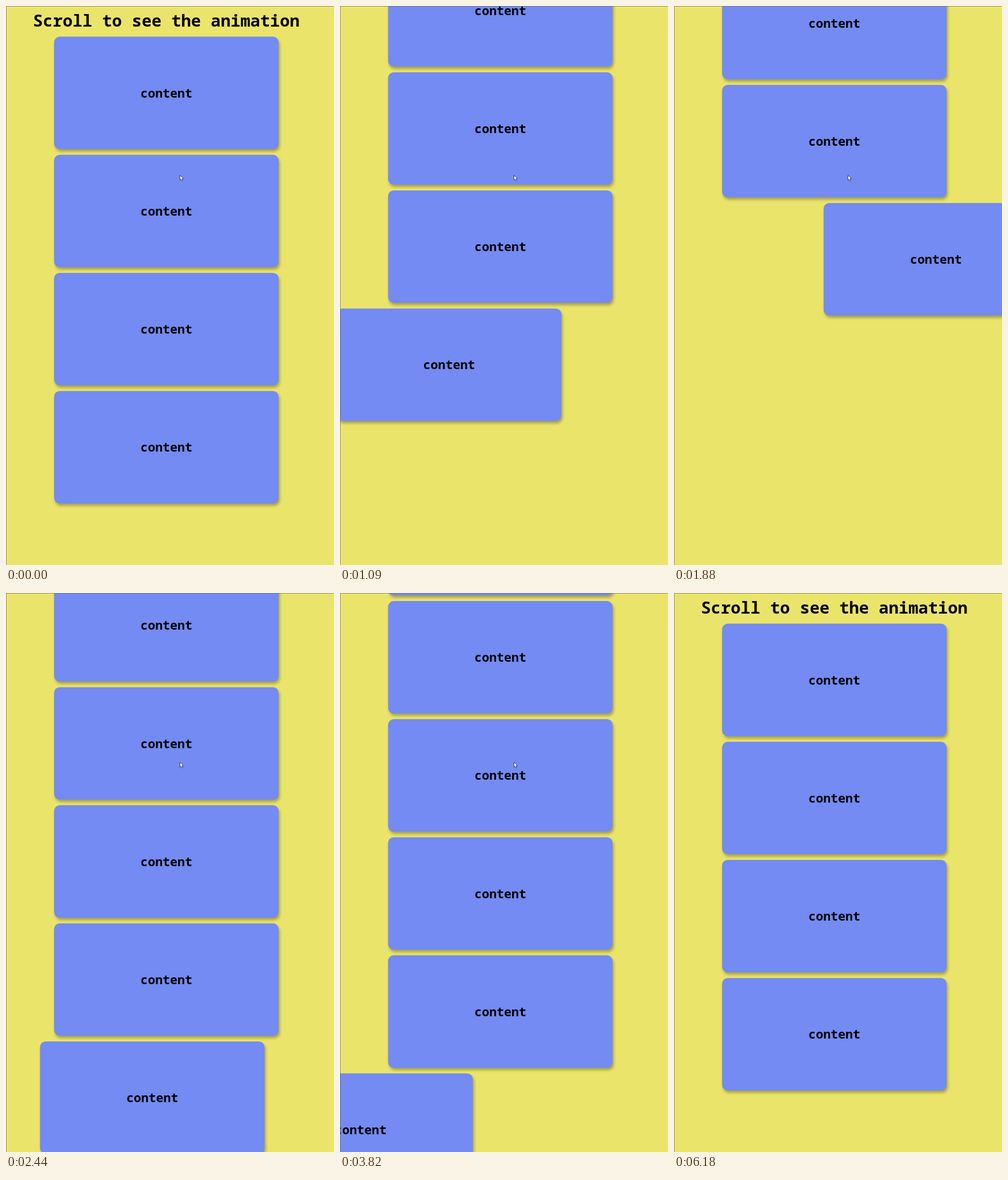
Recreate the animation shown at these times as an HTML page with a canvas. Size 574 by 976 pixels, loop 6560 ms.

```html
<!DOCTYPE html>
<html lang="en">
<head>
<meta charset="utf-8">
<title>Scroll animation</title>
<style>
  html, body { margin: 0; width: 100%; height: 100%; overflow: hidden; background: #ebe46b; }
  canvas { display: block; }
</style>
</head>
<body>
<canvas id="stage" width="574" height="976"></canvas>
<script>
const W = 574, H = 976, LOOP = 6560;
const ctx = document.getElementById('stage').getContext('2d');
const FONT = '"Noto Sans Mono", "DejaVu Sans Mono", monospace';

const COUNT = 12, LEFT = 84.2, TOP = 53.6, BOX_W = 392.8, BOX_H = 196.3, PITCH = 206.2;
const CENTER = LEFT + BOX_W / 2;
const TRIGGER = 791, SLIDE = 400, TRAVEL = BOX_W * 4;

// [time, scroll offset]
const SCROLL = [
  [0, 0], [410, 0], [460, 15], [560, 88], [700, 205], [809, 293.6], [971, 437],
  [1090, 555.2], [1170, 680], [1330, 868], [1400, 884], [1590, 884], [1640, 912.2],
  [1760, 1140], [1880, 1358.2], [1980, 1430], [2106, 1530.8], [2135, 1538.8],
  [2750, 1538.8], [2850, 1490], [3200, 1205], [3500, 950], [3766, 706], [3820, 659],
  [4100, 440], [4400, 282], [4600, 177], [4680, 163.8], [4950, 163.8],
  [5050, 80], [5160, 0], [LOOP, 0]
];

// [time, x, y] of the pointer tip
const POINTER = [
  [0, 304.5, 295.5], [5680, 304.5, 295.5], [5780, 280, 375], [5880, 240, 460],
  [5960, 217, 545], [6040, 197, 600], [6100, 175, 632], [6170, 127, 638], [LOOP, 127, 638]
];
const POINTER_GONE = 6180;

// Monotone cubic interpolation through the given keys
function curve(keys, col) {
  const slope = i => (keys[i + 1][col] - keys[i][col]) / (keys[i + 1][0] - keys[i][0]);
  const tangent = i => {
    if (i === 0 || i === keys.length - 1) return 0;
    const a = slope(i - 1), b = slope(i);
    return a * b > 0 ? 2 * a * b / (a + b) : 0;
  };
  return t => {
    let i = 0;
    while (i < keys.length - 2 && t >= keys[i + 1][0]) i++;
    const h = keys[i + 1][0] - keys[i][0], u = (t - keys[i][0]) / h, v = 1 - u;
    return keys[i][col] * (1 + 2 * u) * v * v + keys[i + 1][col] * (3 - 2 * u) * u * u
      + h * (tangent(i) * u * v * v - tangent(i + 1) * u * u * v);
  };
}

const scrollAt = curve(SCROLL, 1);
const pointerX = curve(POINTER, 1), pointerY = curve(POINTER, 2);

// CSS "ease": cubic-bezier(.25, .1, .25, 1)
function ease(x) {
  if (x <= 0) return 0;
  if (x >= 1) return 1;
  const bez = (u, a, b) => 3 * (1 - u) * (1 - u) * u * a + 3 * (1 - u) * u * u * b + u * u * u;
  let lo = 0, hi = 1;
  for (let i = 0; i < 24; i++) {
    const mid = (lo + hi) / 2;
    if (bez(mid, 0.25, 0.25) < x) lo = mid; else hi = mid;
  }
  return bez(lo, 0.1, 1);
}

// A box is shown while its top lies above the trigger line
const boxes = Array.from({ length: COUNT }, (_, i) => ({
  top: TOP + PITCH * i, side: i % 2 ? -1 : 1, show: -Infinity, hide: Infinity
}));
for (let t = 1; t < LOOP; t++) {
  const before = scrollAt(t - 1), now = scrollAt(t);
  for (const box of boxes) {
    const edge = box.top - TRIGGER;
    if (before <= edge && now > edge) box.show = t;
    if (before > edge && now <= edge && edge > 0) box.hide = t;
  }
}

function text(str, y, size) {
  ctx.font = `700 ${size}px ${FONT}`;
  ctx.fillText(str, 0, y);
}

function drawBox(box, scroll, t) {
  const y = box.top - scroll;
  if (y > H + 10 || y < -BOX_H - 20) return;
  const away = 1 - ease((t - box.show) / SLIDE) + ease((t - box.hide) / SLIDE);
  const dx = box.side * TRAVEL * away;
  if (Math.abs(dx) > W) return;

  ctx.save();
  ctx.translate(dx, y);
  ctx.save();
  ctx.shadowColor = 'rgba(0,0,0,0.3)';
  ctx.shadowOffsetX = 2;
  ctx.shadowOffsetY = 4;
  ctx.shadowBlur = 5;
  ctx.fillStyle = '#738bf2';
  ctx.beginPath();
  ctx.roundRect(LEFT, 0, BOX_W, BOX_H, 9.8);
  ctx.fill();
  ctx.restore();
  ctx.translate(CENTER, 0);
  ctx.fillStyle = '#000';
  text('content', 106.2, 21.6);
  ctx.restore();
}

function drawPointer(x, y) {
  ctx.save();
  ctx.translate(x, y);
  ctx.beginPath();
  [[0, 0], [0, 8.6], [2, 6.9], [3.4, 10], [4.8, 9.4], [3.5, 6.3], [6, 6.1]]
    .forEach(p => ctx.lineTo(...p));
  ctx.closePath();
  ctx.fillStyle = '#fff';
  ctx.fill();
  ctx.strokeStyle = '#25253a';
  ctx.lineWidth = 0.8;
  ctx.stroke();
  ctx.restore();
}

function draw(t) {
  const scroll = scrollAt(t);
  ctx.fillStyle = '#ebe46b';
  ctx.fillRect(0, 0, W, H);
  ctx.textAlign = 'center';

  ctx.save();
  ctx.translate(CENTER, -scroll);
  ctx.fillStyle = '#000';
  text('Scroll to see the animation', 36, 28.8);
  ctx.restore();

  for (const box of boxes) drawBox(box, scroll, t);

  ctx.fillStyle = 'rgba(110,110,110,0.7)';
  ctx.fillRect(0, 0, W, 1);
  ctx.fillRect(0, 0, 1, H);

  if (t < POINTER_GONE) drawPointer(pointerX(t), pointerY(t));
}

const start = performance.now();
function frame() {
  draw((performance.now() - start) % LOOP);
  requestAnimationFrame(frame);
}
frame();
</script>
</body>
</html>
```
